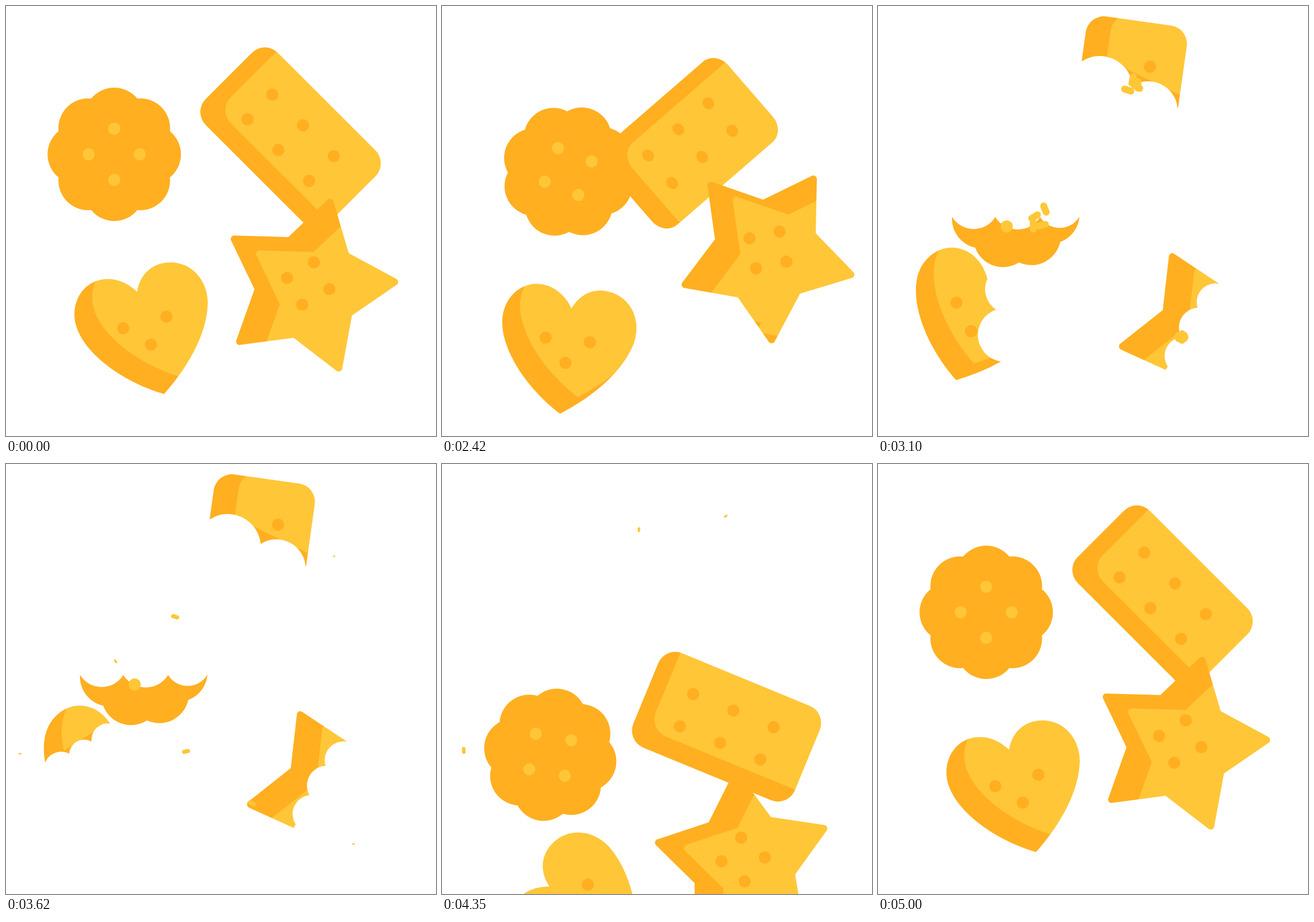
Write an HTML page with a canvas that moves like this. It is 748 by 748 pixels and loops after 5020 ms.

```html
<!DOCTYPE html>
<html>
<head>
<meta charset="utf-8">
<title>Cookies</title>
<style>
  html, body { margin: 0; width: 100%; height: 100%; overflow: hidden; background: #fff; }
  canvas { display: block; }
</style>
</head>
<body>
<canvas id="stage" width="748" height="748"></canvas>
<script>
const SIZE = 748, LOOP = 5020, RAD = Math.PI / 180;
const LIGHT = '#ffc638', DARK = '#ffaf20';
const MOVES = [[2130, 2430], [2800, 3080]], GONE = 3755, RETURN = 3990;
const ctx = document.getElementById('stage').getContext('2d');
const layer = Object.assign(document.createElement('canvas'), { width: SIZE, height: SIZE });
const g = layer.getContext('2d');

const clamp = v => Math.min(1, Math.max(0, v));
const inOut = p => p < .5 ? 4 * p ** 3 : 1 - 4 * (1 - p) ** 3;
const polar = (r, deg) => [r * Math.cos(deg * RAD), r * Math.sin(deg * RAD)];
const range = (n, f) => Array.from({ length: n }, (_, i) => f(i));

function discs(list) {
  const path = new Path2D();
  for (const [x, y, r] of list) {
    path.moveTo(x + r, y);
    path.arc(x, y, r, 0, 7);
  }
  return path;
}

const scallop = discs([[0, 0, 80], ...range(8, i => [...polar(64.4, i * 45), 51.6])]);
const star = new Path2D('M' + range(10, i => polar(i % 2 ? 85.8 : 152, i * 36 - 3)).join('L') + 'Z');
const slab = new Path2D();
slab.roundRect(-152, -88.75, 304, 177.5, 32);
const heart = new Path2D(
  'M-7-63C-1-98 24-114 51-114C89-114 116-82 116-43C115 5 87 62 40 115' +
  'C-45 90-116 30-116-23C-116-57-93-85-58-85C-40-85-23-78-7-63Z');

// poses: x, y, degrees, squash; bites: corner points between tooth marks, open side on the right
// shift: offset of the light top face; enter: height left at 4500 ms, end time, degrees per pixel
const cookies = [
  {
    path: scallop, dot: LIGHT, shift: [0, 0], enter: [82.4, 4903, .14],
    dots: [180, 0, 90, 270].map(deg => polar(44.4, deg)), dotsLeft: [4, 3, 1],
    poses: [[188.3, 258, 0, 0], [219.5, 288, -23.4, 0], [238, 341.5, -71.4, 0]],
    bites: [
      [[199, 179], [160, 258], [109, 311]],
      [[350, 367], [282, 367], [204, 367], [129, 367]]
    ]
  },
  {
    path: slab, dot: DARK, shift: [43.5, -3], enter: [62.7, 4834, .0992],
    dots: range(6, i => [76 - i % 3 * 75.7, i < 3 ? 30.4 : -30.4]), dotsLeft: [6, 4, 1],
    poses: [[495, 229, 45, 0], [431.5, 238.8, -41, .085], [432.5, 176.6, -82, 0]],
    bites: [
      [[383, 156], [370, 268], [337, 342]],
      [[355, 96], [443, 139], [521, 177]]
    ]
  },
  {
    path: star, dot: DARK, rounding: 12, shift: [44, 26], enter: [81, 4990, .097],
    dots: [[11, -42], [-35.4, -15], [38, 4.5], [-9, 31.5]], dotsLeft: [4, 1, 0],
    poses: [[524.4, 488, 0, 0], [564.4, 428.8, 17.6, 0], [576, 574, 32.1, 0]],
    bites: [
      [[484, 405], [559, 445], [604, 515]],
      [[504, 627], [528, 576], [556, 525], [592, 483]]
    ]
  },
  {
    path: heart, dot: DARK, shift: [31, -29], enter: [85.3, 4990, .2],
    dots: [[-31, .5], [17, 29], [44, -19.5]], dotsLeft: [3, 2, 0],
    poses: [[235, 560, 0, 0], [209, 587.7, 21.2, 0], [163, 532, 32, 0]],
    bites: [
      [[276, 663], [250, 576], [264, 494]],
      [[66, 530], [110, 504], [149, 483], [187, 453]]
    ]
  }
];
cookies.forEach((cookie, i) => cookie.delay = i * 10);

// Everything beyond a row of tooth marks; "bulge" is the depth of a mark relative to its width.
function bitePath(points, bulge) {
  const first = points[0], last = points.at(-1);
  const length = Math.hypot(last[0] - first[0], last[1] - first[1]);
  const ax = (last[0] - first[0]) / length * SIZE, ay = (last[1] - first[1]) / length * SIZE;
  let d = `M${first}`;
  points.slice(1).forEach(([x, y], i) => {
    const chord = Math.hypot(x - points[i][0], y - points[i][1]);
    const r = bulge ? chord * (.25 + bulge ** 2) / (2 * bulge) : 0;
    d += `A${r} ${r} 0 0 1 ${x} ${y}`;
  });
  return new Path2D(d + `l${ax} ${ay}l${-ay} ${ax}` +
    `L${first[0] - ax - ay} ${first[1] - ay + ax}L${first[0] - ax} ${first[1] - ay}Z`);
}

function poseAt(cookie, t) {
  const pose = [...cookie.poses[0]];
  if (t >= RETURN) {
    const [left, end, spin] = cookie.enter;
    const drop = left * (Math.max(0, end - t) / (end - 4500)) ** 3.5;
    pose[1] += drop;
    pose[2] -= drop * spin;
    return { pose, bites: 0, turn: -drop * spin };
  }
  let bites = 0;
  MOVES.forEach(([from, to], i) => {
    const local = t - cookie.delay, p = inOut(clamp((local - from) / (to - from)));
    if (local >= to) bites = i + 1;
    pose.forEach((v, k) => pose[k] = v + (cookie.poses[i + 1][k] - v) * p);
  });
  return { pose, bites, turn: 0 };
}

function fillPosed(path, [x, y, deg, squash], color, rounding, dx = 0, dy = 0) {
  g.save();
  g.translate(x + dx, y + dy);
  g.rotate(deg * RAD);
  g.scale(1 - squash, 1 + squash / 2);
  g.fillStyle = g.strokeStyle = color;
  g.fill(path);
  if (rounding) {
    g.lineWidth = rounding;
    g.lineJoin = 'round';
    g.stroke(path);
  }
  g.restore();
}

function bite(cookie, stage, pose) {
  const home = cookie.poses[stage], points = cookie.bites[stage - 1];
  const [dx, dy] = cookie.shift;
  g.save();
  g.translate(pose[0], pose[1]);
  g.rotate((pose[2] - home[2]) * RAD);
  g.translate(-home[0], -home[1]);
  // the cut side of the biscuit is dark
  g.fillStyle = DARK;
  g.fill(bitePath([points[0], points.at(-1)].map(([x, y]) => [x + dx, y + dy]), 0));
  g.globalCompositeOperation = 'destination-out';
  g.fill(bitePath(points, stage === 1 ? .4 : .28));
  g.restore();
}

function drawCookie(cookie, t) {
  if (t >= GONE + cookie.delay && t < RETURN) return;
  const { pose, bites, turn } = poseAt(cookie, t);
  const { path, rounding, shift: [a, b] } = cookie;
  g.clearRect(0, 0, SIZE, SIZE);
  fillPosed(path, pose, DARK, rounding);
  g.globalCompositeOperation = 'source-atop';
  if (a) {
    const c = Math.cos(turn * RAD), s = Math.sin(turn * RAD);
    for (let k = 1; k < 4; k++) fillPosed(path, pose, LIGHT, rounding, k * (a * c - b * s), k * (a * s + b * c));
  }
  if (bites) bite(cookie, bites, pose);
  g.globalCompositeOperation = 'source-over';
  const dots = cookie.dots.slice(0, cookie.dotsLeft[bites]);
  fillPosed(discs(dots.map(dot => [...dot, 10.6])), pose, cookie.dot);
  ctx.drawImage(layer, 0, 0);
}

let seed = 11;
const random = () => (seed = seed * 16807 % 2147483647) / 2147483647;

// Each bite throws a ring of crumbs from its middle, the last one from the whole piece.
function ring(cookie, stage) {
  const points = cookie.bites[stage];
  const [x, y] = points ? points[1] : cookie.poses[2];
  const start = (points ? MOVES[stage][1] : GONE) + cookie.delay;
  return range(4, i => ({
    x, y, start,
    angle: (i + random()) * 90,
    reach: 90 + 130 * random(),
    tilt: 180 * random(),
    life: 400 + 320 * random()
  }));
}
const crumbs = range(3, stage => cookies.map(cookie => ring(cookie, stage))).flat(2);

function drawCrumb({ x, y, start, angle, reach, tilt, life }, t) {
  const age = t - start, scale = Math.min(1, (life - age) / 300);
  if (age < 0 || scale <= 0) return;
  const [ox, oy] = polar(reach * (1 - Math.exp(-age / 200)), angle);
  const [dx, dy] = polar(5.8 * scale, tilt);
  ctx.lineWidth = 12 * scale;
  ctx.beginPath();
  ctx.moveTo(x + ox - dx, y + oy - dy);
  ctx.lineTo(x + ox + dx, y + oy + dy);
  ctx.stroke();
}

function frame() {
  const t = performance.now() % LOOP;
  ctx.fillStyle = '#fff';
  ctx.fillRect(0, 0, SIZE, SIZE);
  ctx.strokeStyle = LIGHT;
  ctx.lineCap = 'round';
  cookies.forEach(cookie => drawCookie(cookie, t));
  crumbs.forEach(crumb => drawCrumb(crumb, t));
  requestAnimationFrame(frame);
}
frame();
</script>
</body>
</html>
```
